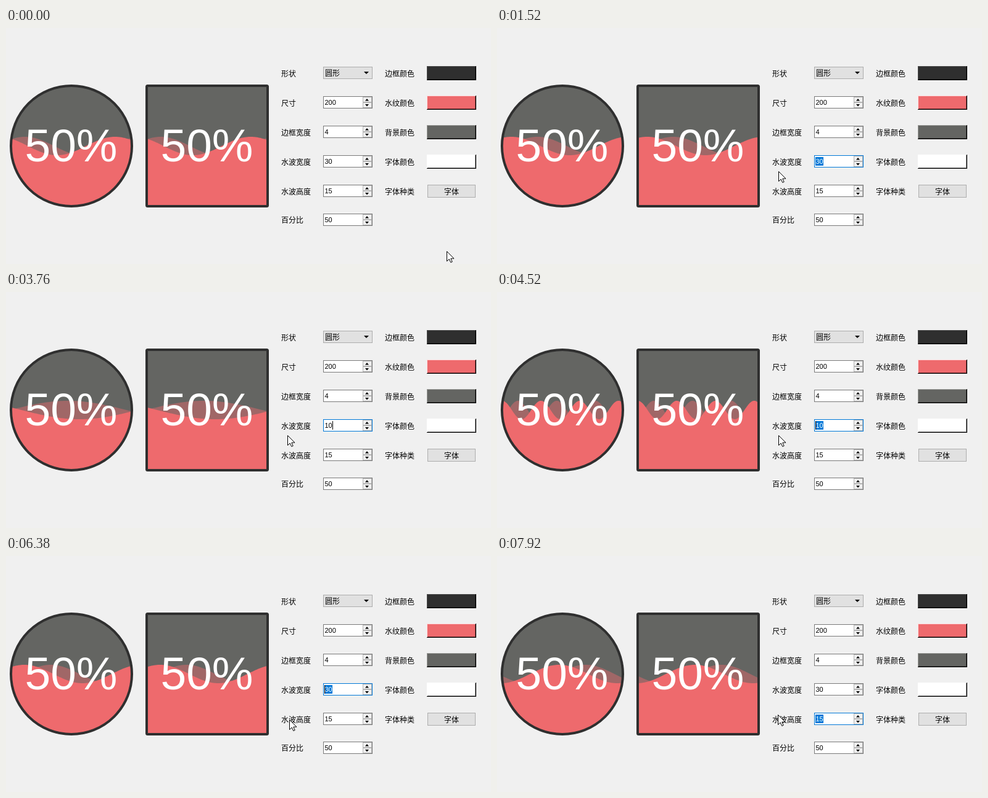
An HTML page that plays this animation: 786 px wide and 384 px high, repeating every 7.99 s.

```html
<!DOCTYPE html>
<html lang="zh">
<head>
<meta charset="utf-8">
<style>
  html, body { margin: 0; width: 100%; height: 100%; overflow: hidden; background: #f0f0f0; }
  svg { display: block; width: 786px; height: 384px; }
  text { font: 12px "Noto Sans CJK SC", "Noto Sans CJK", sans-serif; fill: #000; white-space: pre; }
  .num { font: 11px "Liberation Sans", Arial, sans-serif; }
  .big { font: 75px "Liberation Sans", Arial, sans-serif; fill: #fff; text-anchor: middle; }
  .crisp { shape-rendering: crispEdges; }
</style>
</head>
<body>
<svg id="stage" viewBox="0 0 786 384">
  <defs>
    <clipPath id="disc"><circle cx="100" cy="100" r="97"/></clipPath>
    <clipPath id="box"><rect x="3" y="3" width="194" height="194"/></clipPath>
  </defs>
  <g id="gauges"></g>
  <g id="form"></g>
  <path id="mouse" d="M.5.5V16.5L4.2 13L6.8 18.5L9.2 17.4L6.8 12.1H12Z" fill="#fff" stroke="#000" stroke-linejoin="round"/>
</svg>
<script>
const LOOP = 7990, FRAME = 76.8, BLINK = 530;
const RED = '#ee6a6d', GRAY = '#646562', DARK = '#2f2f2f', BLUE = '#0078d7';
const WAVE_HEIGHT = 15, PHASE_START = 5.3, PHASE_STEP = 0.6;
const CHAR = 6.12, TEXT_X = 516;

const $ = id => document.getElementById(id);
const form = $('form');

function add(parent, tag, attrs, text) {
  const node = document.createElementNS('http://www.w3.org/2000/svg', tag);
  for (const key in attrs) node.setAttribute(key, attrs[key]);
  if (text) node.textContent = text;
  return parent.appendChild(node);
}
function set(node, attrs) {
  for (const key in attrs) node.setAttribute(key, attrs[key]);
}
const frameRect = (x, y, width, height, fill, stroke) =>
  add(form, 'rect', { x: x + .5, y: y + .5, width: width - 1, height: height - 1, fill, stroke, class: 'crisp' });
const label = (x, y, text) => add(form, 'text', { x, y }, text);

function gauge(x, shape, clip) {
  const g = add($('gauges'), 'g', { transform: `translate(${x} 92)` });
  const inner = add(g, 'g', { 'clip-path': `url(#${clip})` });
  add(inner, 'rect', { width: 200, height: 200, fill: GRAY });
  const back = add(inner, 'path', { fill: RED, 'fill-opacity': .43 });
  const front = add(inner, 'path', { fill: RED });
  add(g, shape, { cx: 100, cy: 100, r: 98, x: 2, y: 2, width: 196, height: 196,
    ...(shape === 'rect' && { rx: 1.5 }), fill: 'none', stroke: DARK, 'stroke-width': 4 });
  add(g, 'text', { x: 99.5, y: 125, class: 'big' }, '50%');
  return { back, front };
}
const gauges = [gauge(6, 'circle', 'disc'), gauge(226, 'rect', 'box')];

function spinBox(y, value) {
  const border = frameRect(514, y, 80, 20, '#fff', '#7a7a7a');
  for (const top of [y + 1, y + 10]) frameRect(578, top, 15, 9, '#f0f0f0', '#b4b4b4');
  add(form, 'path', { d: `M582 ${y + 7.5}h6l-3-3.5zM582 ${y + 13}h6l-3 3.5z` });
  const mark = add(form, 'rect', { y: y + 3, height: 14, fill: BLUE, class: 'crisp' });
  const text = add(form, 'text', { x: TEXT_X + .5, y: y + 14, class: 'num' });
  const plain = add(text, 'tspan', {}, value);
  const chosen = add(text, 'tspan', { fill: '#fff' });
  const caret = add(form, 'rect', { y: y + 3, width: 1, height: 14, visibility: 'hidden', class: 'crisp' });
  // `from` is the index where the selection begins; it always runs to the end.
  return ({ value, from = value.length, focus = false, caretAt = -1 }) => {
    set(border, { stroke: focus ? BLUE : '#7a7a7a' });
    plain.textContent = value.slice(0, from);
    chosen.textContent = value.slice(from);
    set(mark, { x: TEXT_X + Math.round(from * CHAR), width: Math.round((value.length - from) * CHAR) + (from < value.length) });
    set(caret, { x: TEXT_X + Math.round(caretAt * CHAR) + (caretAt > 0),
      visibility: caretAt < 0 ? 'hidden' : 'visible' });
  };
}

// Raised button: light top and left, black outside and a darker tone inside at bottom and right.
function colorButton(y, color, light, dark) {
  const edge = (d, stroke) => add(form, 'path', { d, fill: 'none', stroke, class: 'crisp' });
  add(form, 'rect', { x: 682, y, width: 80, height: 23, fill: color, class: 'crisp' });
  edge(`M682.5 ${y + 22}V${y + .5}H761`, light);
  edge(`M683 ${y + 21.5}H760.5V${y + 1}`, dark);
  edge(`M682 ${y + 22.5}H761.5V${y}`, '#000');
}

['形状', '尺寸', '边框宽度', '水波宽度', '水波高度', '百分比']
  .forEach((name, i) => label(446, i < 5 ? 78.5 + 48 * i : 316.5, name));
['边框颜色', '水纹颜色', '背景颜色', '字体颜色', '字体种类']
  .forEach((name, i) => label(614, 78.5 + 48 * i, name));

frameRect(514, 63, 80, 20, '#e1e1e1', '#adadad');
label(517, 77.5, '圆形');
add(form, 'path', { d: 'M580 71h8l-4 4z' });

const [, , widthBox, heightBox] = [[111, '200'], [159, '4'], [207, '30'], [255, '15'], [302, '50']]
  .map(([y, value]) => { const box = spinBox(y, value); box({ value }); return box; });

colorButton(62, DARK, '#474747', '#181818');
colorButton(110, RED, '#ffd7d8', '#773537');
colorButton(158, GRAY, '#969793', '#323231');
colorButton(206, '#fff', '#fff', '#808080');
frameRect(683, 255, 78, 21, '#e1e1e1', '#adadad');
label(710, 270.5, '字体');

const mousePath = [
  [0, 714, 363], [820, 565, 240], [1000, 540, 217], [1450, 456, 233], [5950, 456, 233],
  [6380, 459, 266], [6600, 505, 300], [6780, 553, 286], [6950, 542, 266], [7600, 455, 258], [LOOP, 455, 258]
];
function mouseAt(t) {
  const i = Math.max(1, mousePath.findIndex(p => p[0] >= t));
  const [t0, x0, y0] = mousePath[i - 1], [t1, x1, y1] = mousePath[i];
  const k = (t - t0) / (t1 - t0), ease = k * k * (3 - 2 * k);
  return [Math.round(x0 + (x1 - x0) * ease), Math.round(y0 + (y1 - y0) * ease)];
}

const PRESS_WIDTH = 1000, PRESS_HEIGHT = 6950;
// [time, value, committed]: committing selects the value and applies it.
const edits = [
  [1820, '6'], [2000, '60'], [2270, '60', true],
  [3520, '1'], [3670, '10'], [4060, '10', true],
  [5360, '3'], [5510, '30'], [5900, '30', true]
];

const dragFrom = x => x < 519 ? 0 : x < 526 ? 1 : 2;

function widthField(t, mouseX) {
  if (t < PRESS_WIDTH || t >= PRESS_HEIGHT) return { value: '30' };
  const edit = edits.filter(e => e[0] <= t).pop();
  if (!edit) return { value: '30', focus: true, from: dragFrom(mouseX) };
  const [start, value, done] = edit;
  const from = done ? 0 : value.length;
  const lit = Math.floor((t - start) / BLINK) % 2 === 0;
  return { value, from, focus: true, caretAt: lit ? from : -1 };
}

function waveWidth(t) {
  const last = edits.filter(e => e[2] && e[0] <= t).pop();
  return last ? +last[1] : 30;
}

function wavePath(width, phase) {
  let d = 'M0 200';
  for (let x = 0; x <= 200; x++) d += `L${x} ${(100 + WAVE_HEIGHT * Math.sin(x / width + phase)).toFixed(2)}`;
  return d + 'L200 200Z';
}

function draw(now) {
  const t = now % LOOP;
  const frame = Math.floor(t / FRAME + .3);
  const shown = Math.min(LOOP, frame * FRAME);

  // The wave timer is slower than the picture rate, so every sixth picture repeats the wave.
  const steps = frame - Math.max(0, Math.floor((frame - 11) / 6));
  const phase = PHASE_START + PHASE_STEP * steps;
  const width = waveWidth(t);
  const front = wavePath(width, phase), back = wavePath(width, phase + width);
  for (const g of gauges) {
    set(g.front, { d: front });
    set(g.back, { d: back });
  }

  const [x, y] = mouseAt(shown);
  set($('mouse'), { transform: `translate(${x} ${y})` });
  widthBox(widthField(t, x));
  heightBox(t < PRESS_HEIGHT ? { value: '15' } : { value: '15', focus: true, from: dragFrom(x) });
}

const start = performance.now();
(function tick() {
  draw(performance.now() - start);
  requestAnimationFrame(tick);
})();
</script>
</body>
</html>
```
